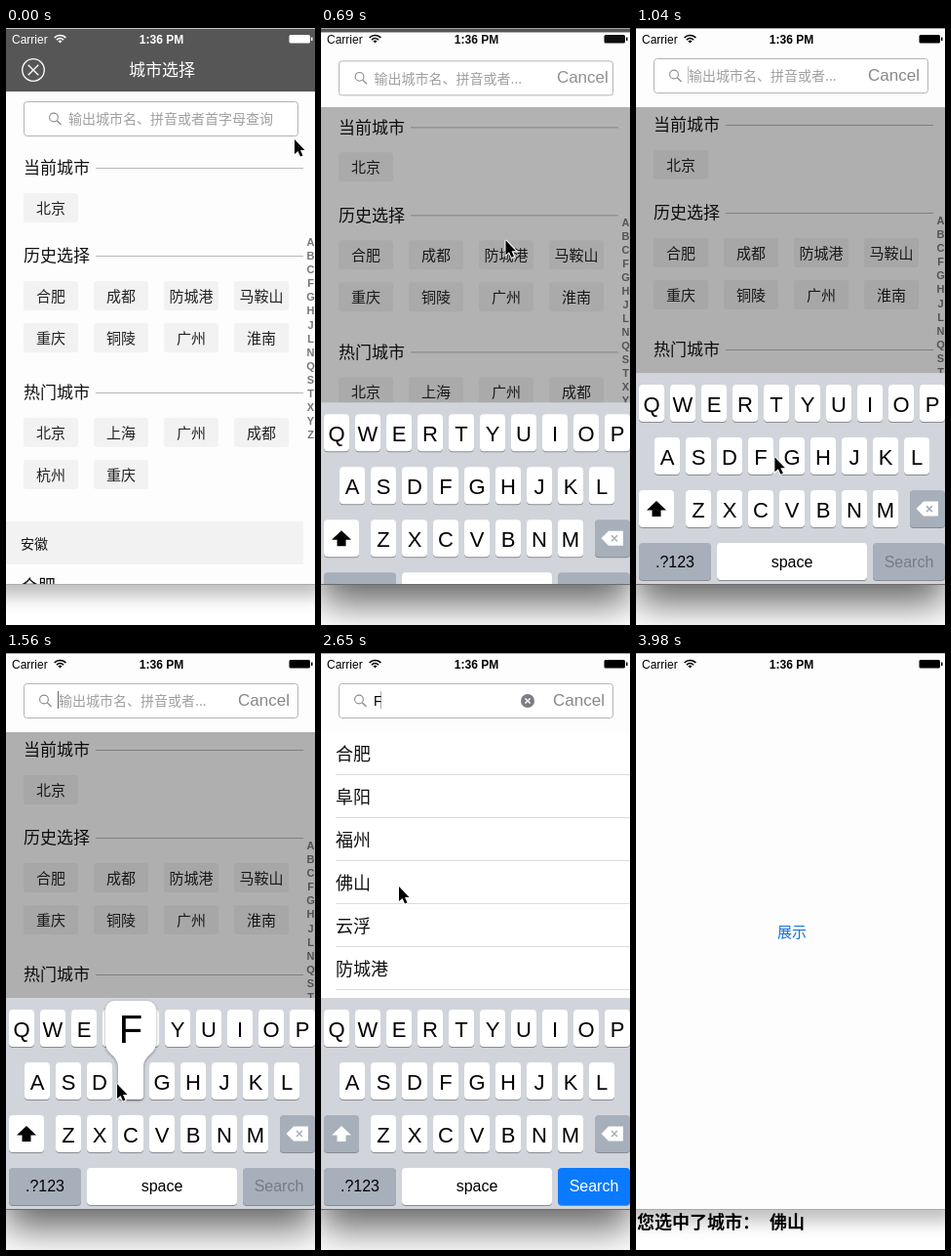
These frames come from a looping animation (317 by 611 pixels, 4.03 s). An HTML page with a canvas:

```html
<!DOCTYPE html>
<html lang="zh-CN">
<head>
<meta charset="utf-8">
<style>
html, body { margin: 0; width: 100%; height: 100%; overflow: hidden; background: #fff; }
canvas { display: block; }
</style>
</head>
<body>
<canvas width="317" height="611"></canvas>
<script>
const c = document.querySelector('canvas').getContext('2d');
const W = 317, H = 569, LOOP = 4030;
const FOCUS = 455, EDIT = 502, POPUP = 1500, TYPED = 1670, PICK = 2806, BLUR = 3980;
const LATIN = '"Liberation Sans", Arial, sans-serif';
const HAN = '"Noto Sans CJK SC", "Noto Sans CJK", sans-serif';

const clamp = x => Math.min(1, Math.max(0, x));
const ramp = (t, a, b) => clamp((t - a) / (b - a));
const smooth = x => x * x * (3 - 2 * x);
const mix = (a, b, p) => a + (b - a) * p;
// Critically damped spring from 0 to 1
const spring = ms => ms <= 0 ? 0 : 1 - (1 + .0183 * ms) * Math.exp(-.0183 * ms);

function text(s, x, cy, size, color = '#111', align = 'left', font = HAN, weight = '') {
  c.font = `${weight} ${size}px ${font}`;
  c.textAlign = align;
  c.fillStyle = color;
  c.fillText(s, x, cy + size * .37);
}

function box(x, y, w, h, r, fill, stroke) {
  c.beginPath();
  c.roundRect(x, y, w, h, r);
  if (fill) { c.fillStyle = fill; c.fill(); }
  if (stroke) { c.strokeStyle = stroke; c.lineWidth = 1; c.stroke(); }
}

function rect(x, y, w, h, fill) {
  c.fillStyle = fill;
  c.fillRect(x, y, w, h);
}

function lines(color, width, ...paths) {
  c.strokeStyle = color;
  c.lineWidth = width;
  c.beginPath();
  for (const p of paths)
    for (let i = 0; i < p.length; i += 2) c[i ? 'lineTo' : 'moveTo'](p[i], p[i + 1]);
  c.stroke();
}

function shape(fill, pts) {
  c.beginPath();
  for (let i = 0; i < pts.length; i += 2) c.lineTo(pts[i], pts[i + 1]);
  c.closePath();
  c.fillStyle = fill;
  c.fill();
}

function disc(x, y, r) {
  c.beginPath();
  c.arc(x, y, r, 0, 7);
}

function cross(x, y, r, color, width) {
  lines(color, width, [x - r, y - r, x + r, y + r], [x + r, y - r, x - r, y + r]);
}

function shadow(active) {
  c.save();
  c.shadowColor = active ? 'rgba(0,0,0,.6)' : 'rgba(0,0,0,.25)';
  c.shadowBlur = active ? 36 : 16;
  c.shadowOffsetY = active ? 20 : 13;
  if (active) rect(0, 0, W, H, '#fff');
  else rect(-12, 0, W + 20, H, '#fff');
  c.restore();
  rect(0, H, W, 1, active ? '#6c6c6c' : '#acacac');
}

function status(color) {
  text('Carrier', 6, 11.3, 12, color, 'left', LATIN);
  text('1:36 PM', 159.5, 11.3, 12, color, 'center', LATIN, 'bold');
  c.strokeStyle = color;
  c.lineWidth = 1.7;
  for (const r of [4.8, 8]) {
    c.beginPath();
    c.arc(55.5, 15.5, r, -Math.PI * .76, -Math.PI * .24);
    c.stroke();
  }
  shape(color, [55.5, 15.5, 53.4, 13.3, 55.5, 12.4, 57.6, 13.3]);
  box(290.5, 7, 21.5, 8.5, 1.5, color);
  rect(313, 9.5, 1.5, 3.5, color);
}

function header() {
  rect(0, 0, W, 65, '#565656');
  disc(28, 43, 11.3);
  c.strokeStyle = '#fff';
  c.lineWidth = 1.3;
  c.stroke();
  cross(28, 43, 5.3, '#fff', 1.3);
  text('城市选择', 160, 43, 17, '#fff', 'center');
}

function section(title, y, rows) {
  text(title, 18, y, 17);
  rect(92, y, 213, 1, '#b9b9b9');
  rows.forEach((row, j) => row.split(' ').forEach((name, i) => {
    const x = 18 + 72 * i, top = y + 26 + 43 * j;
    box(x, top, 56, 30, 3, '#f2f2f2');
    text(name, x + 28, top + 15, 15, '#222', 'center');
  }));
}

function cities() {
  section('当前城市', 143, ['北京']);
  section('历史选择', 233, ['合肥 成都 防城港 马鞍山', '重庆 铜陵 广州 淮南']);
  section('热门城市', 373, ['北京 上海 广州 成都', '杭州 重庆']);
  rect(0, 505, 305, 44, '#f2f2f2');
  text('安徽', 15, 528, 14);
  text('合肥', 15, 571, 18);
}

function letterIndex(p) {
  const step = 14.07 * (p > 0 ? 1 - .08 * (1 - p) : 1);
  [...'ABCFGHJLNQSTXYZ'].forEach((ch, i) =>
    text(ch, 312.5, 317.5 - 22 * p + (i - 7) * step, 11, '#777', 'center', LATIN, 'bold'));
}

function caretAlpha(t) {
  if (t < TYPED) return ramp(t, 1000, 1100);
  return 1 - ramp(t, 2180, 2300) + .85 * ramp(t, 2480, 2760);
}

function searchField(t, p) {
  const typed = t >= TYPED, dx = -10 * p;
  box(18.5, 75.5, 281, 35, 3, '#fff', '#b4b4b4');
  disc(49 + dx, 91.5, 4.4);
  c.strokeStyle = '#8c8c8c';
  c.lineWidth = 1.1;
  c.stroke();
  lines('#8c8c8c', 1.3, [52.2 + dx, 94.8, 56.5 + dx, 99]);
  if (typed) {
    text('F', 54, 92.5, 14, '#000', 'left', LATIN);
    disc(212, 93, 7);
    c.fillStyle = '#7c7e83';
    c.fill();
    cross(212, 93, 2.6, '#fff', 1.4);
  } else {
    text(p > 0 ? '输出城市名、拼音或者...' : '输出城市名、拼音或者首字母查询', 64 + dx, 93, 14, '#a0a0a0');
  }
  if (p > 0) {
    c.save();
    c.beginPath();
    c.rect(18, 75, 282, 36);
    c.clip();
    c.globalAlpha = p;
    text('Cancel', mix(310, 238, p), 91.5, 17, '#888', 'left', LATIN);
    c.restore();
  }
  c.globalAlpha = caretAlpha(t);
  rect(typed ? 61 : 53, 83, 1, 18, '#666');
  c.globalAlpha = 1;
}

function results() {
  rect(0, 81, W, H, '#fff');
  ['合肥', '阜阳', '福州', '佛山', '云浮', '防城港'].forEach((name, i) => {
    text(name, 15, 103 + 44 * i, 18);
    rect(15, 124 + 44 * i, W, 1, '#dcdcdc');
  });
}

function key(x, y, w, fill, label, size, color) {
  box(x, y + 1, w, 38, 4, '#888b90');
  box(x, y, w, 38, 4, fill);
  if (label) text(label, x + w / 2, y + (size > 20 ? 19.5 : 18.5), size, color, 'center', LATIN);
}

function popup() {
  c.beginPath();
  c.moveTo(102, 366);
  c.arcTo(102, 356, 112, 356, 9);
  c.arcTo(154, 356, 154, 366, 9);
  c.lineTo(154, 398);
  c.bezierCurveTo(154, 412, 141, 410, 141, 425);
  c.arcTo(141, 457, 128, 457, 4);
  c.arcTo(115, 457, 115, 425, 4);
  c.lineTo(115, 425);
  c.bezierCurveTo(115, 410, 102, 412, 102, 398);
  c.closePath();
  c.save();
  c.shadowColor = 'rgba(0,0,0,.4)';
  c.shadowBlur = 3;
  c.shadowOffsetY = 1;
  c.fillStyle = '#fff';
  c.fill();
  c.restore();
  text('F', 128, 384, 40, '#000', 'center', LATIN);
}

function keyboard(t) {
  const typed = t >= TYPED, gray = '#a7afba';
  rect(0, 353, W, 300, '#d1d5db');
  ['QWERTYUIOP', 'ASDFGHJKL', 'ZXCVBNM'].forEach((row, j) => [...row].forEach((ch, i) =>
    key([3, 19, 51][j] + 32 * i, 365 + 54 * j, 26, '#fff', ch, 22, '#000')));
  key(3, 473, 36, typed ? gray : '#fff');
  shape(typed ? '#fff' : '#000', [21, 484, 31, 493.5, 25.5, 493.5, 25.5, 500, 16.5, 500, 16.5, 493.5, 11, 493.5]);
  key(281, 473, 36, gray);
  shape('#fff', [287.5, 492, 295, 484.5, 310, 484.5, 310, 499.5, 295, 499.5]);
  cross(301, 492, 3, gray, 1.5);
  key(3, 527, 74, gray, '.?123', 16, '#000');
  key(83, 527, 154, '#fff', 'space', 16, '#000');
  key(243, 527, 74, typed ? '#0a7aff' : gray, 'Search', 16, typed ? '#fff' : '#757c86');
  if (t >= POPUP && !typed) popup();
}

const route = [
  [60, 296, 114], [430, 199, 98], [600, 199, 98], [810, 177, 373], [960, 150, 438],
  [1300, 118, 443], [1420, 114, 441], [1850, 114, 441], [2250, 80, 239],
  [2780, 80, 239], [2980, -16, 250]
];

function pointer(t) {
  let i = route.findIndex(r => r[0] > t);
  if (i < 0) return;
  const b = route[i], a = route[Math.max(0, i - 1)];
  const p = a === b ? 0 : ramp(t, a[0], b[0]);
  c.save();
  c.translate(mix(a[1], b[1], p), mix(a[2], b[2], p));
  const arrow = [0, 0, 0, 15, 3.5, 12, 6, 17.5, 8.5, 16.5, 6, 11, 10.5, 11, 0, 0];
  lines('#fff', 2, arrow);
  shape('#000', arrow);
  c.restore();
}

function draw(t) {
  const active = t >= FOCUS && t < BLUR;
  const p = smooth(ramp(t, EDIT, EDIT + 220));
  const away = spring(t - PICK);

  rect(0, 0, W, 611, '#fff');
  shadow(active);

  c.save();
  c.beginPath();
  c.rect(0, 0, W, H);
  c.clip();
  rect(0, 0, W, H, '#fdfdfd');
  text('展示', 160, 285, 15, '#1473dc', 'center');

  c.save();
  c.translate(0, 568 * away);
  rect(0, 0, W, H, '#fdfdfd');
  c.save();
  c.translate(0, -44 * p);
  cities();
  searchField(t, p);
  c.restore();
  if (t < TYPED) {
    letterIndex(p);
    rect(0, 81, W, H, `rgba(0,0,0,${.31 * p ** .6})`);
  } else results();
  c.translate(0, -64 * p);
  if (p < 1) header();
  c.restore();

  const tone = 255 * (1 - p);
  status(`rgb(${tone},${tone},${tone})`);
  c.translate(0, 216 * (1 - spring(t - EDIT) + away));
  keyboard(t);
  c.restore();

  rect(0, 0, W, 1, active ? '#a2a2a2' : '#c6c6c6');
  if (t >= PICK) {
    text('您选中了城市：', 1, 582.5, 18, '#000', 'left', HAN, 'bold');
    text('佛山', 137, 582.5, 18, '#000', 'left', HAN, 'bold');
  }
  pointer(t);
}

function tick() {
  draw(performance.now() % LOOP);
  requestAnimationFrame(tick);
}
tick();
</script>
</body>
</html>
```
